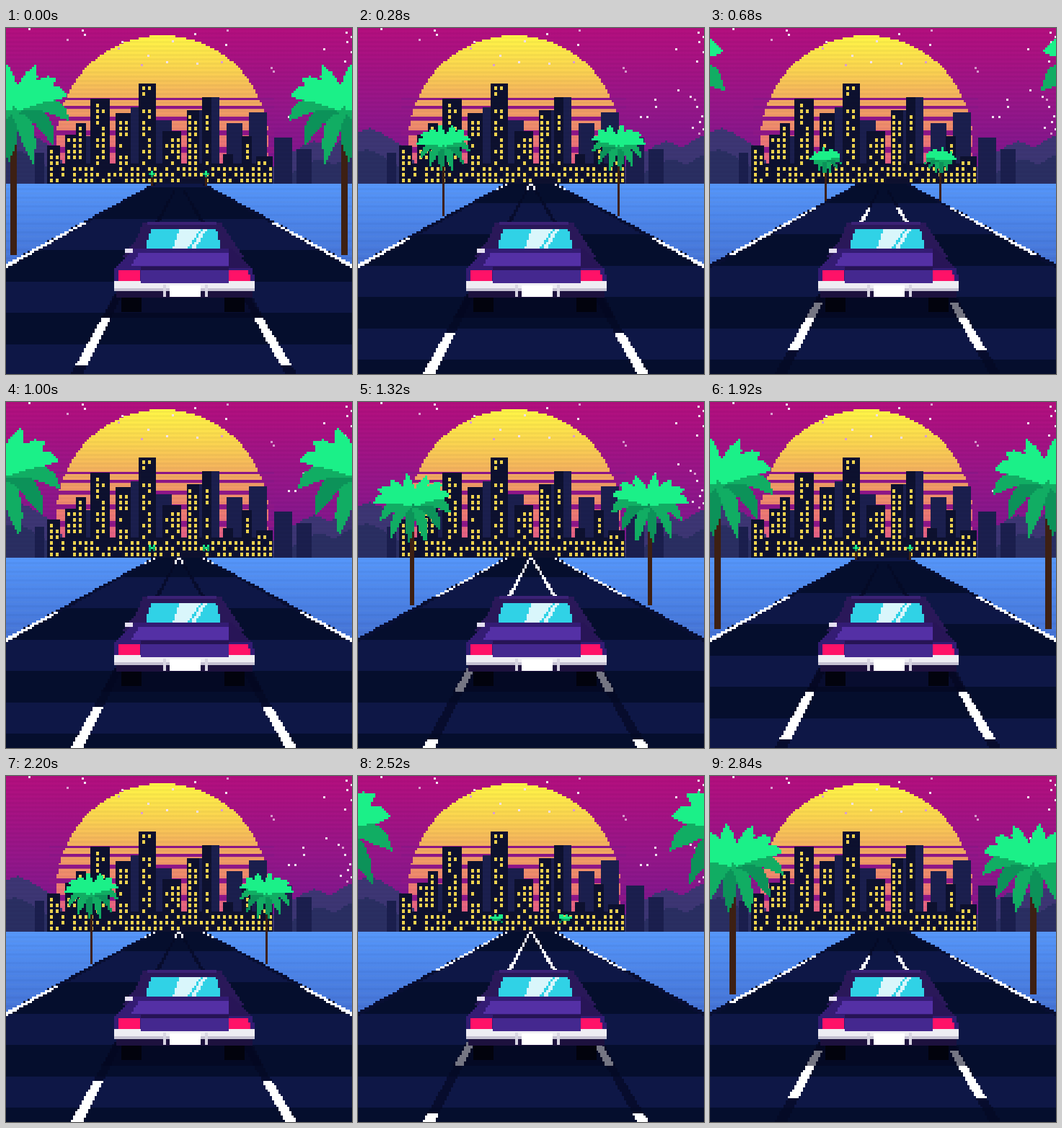
Recreate the animation shown at these times as an HTML page with a canvas. Size 480 by 480 pixels, loop 2.88 s.

```html
<!DOCTYPE html>
<html lang="en">
<head>
<meta charset="utf-8">
<title>Sunset drive</title>
<style>
html, body { margin: 0; width: 100%; height: 100%; overflow: hidden; background: #0b123c; }
canvas { display: block; width: 100vw; height: 100vh; image-rendering: pixelated; }
</style>
</head>
<body>
<canvas id="stage" width="480" height="480"></canvas>
<script>
const SIZE = 480, PX = 3, STEP = 40, LOOP = 2880, HORIZON = 216;
const stage = document.getElementById('stage').getContext('2d');
let ctx = stage;

function rect(x, y, w, h, color) {
  ctx.fillStyle = color;
  ctx.fillRect(x, y, w, h);
}

// Fills a polygon in rows of chunky pixels.
function poly(points, color) {
  ctx.fillStyle = color;
  const ys = points.map(p => p[1]);
  const top = Math.max(0, Math.floor(Math.min(...ys) / PX) * PX);
  const end = Math.min(SIZE, Math.max(...ys));
  for (let y = top; y < end; y += PX) {
    const mid = y + PX / 2, hits = [];
    points.forEach(([x1, y1], i) => {
      const [x2, y2] = points[(i + 1) % points.length];
      if ((y1 <= mid) !== (y2 <= mid)) hits.push(x1 + (mid - y1) / (y2 - y1) * (x2 - x1));
    });
    hits.sort((a, b) => a - b);
    for (let i = 0; i + 1 < hits.length; i += 2) {
      const a = Math.round(hits[i] / PX) * PX, b = Math.round(hits[i + 1] / PX) * PX;
      if (b > a) ctx.fillRect(a, y, b - a, PX);
    }
  }
}

// Four-sided shape given by its left and right ends at two heights.
const slab = (y1, l1, r1, y2, l2, r2, color) => poly([[l1, y1], [r1, y1], [r2, y2], [l2, y2]], color);

function gradient(y1, y2, ...colors) {
  const g = ctx.createLinearGradient(0, y1, 0, y2);
  colors.forEach((c, i) => g.addColorStop(i / (colors.length - 1), c));
  return g;
}

function layer(draw) {
  const c = document.createElement('canvas');
  c.width = c.height = SIZE;
  ctx = c.getContext('2d');
  draw();
  ctx = stage;
  return c;
}

const noise = (x, y) => {
  const v = Math.sin(x * 12.9898 + y * 78.233) * 43758.5453;
  return v - Math.floor(v);
};

function sky() {
  rect(0, 0, SIZE, HORIZON, gradient(0, HORIZON, '#b40f7e', '#961689', '#74188f'));
  const sun = gradient(10, 200, '#fff646', '#fbd450', '#f3a862', '#ee7c72', '#e2548c');
  for (let y = 10; y < HORIZON; y += PX) {
    const half = Math.round(Math.sqrt(147 ** 2 - (y + 1 - 157) ** 2) / PX) * PX;
    rect(217 - half, y, half * 2, PX, sun);
  }
  for (let i = 0; i < 6; i++) rect(60, 97 + 9 * i + 2 * i * i, 312, 3 + 1.3 * i, '#8f1789');
  // Stars thicken towards the upper right.
  for (let i = 1; i < 38; i++) {
    const x = 480 * (1 - 0.95 * noise(i, 3) ** 2), y = 150 * noise(i, 8) * x / 480;
    rect(Math.round(x), Math.round(y), 3, 3, i % 4 ? '#f6e6f5' : '#dc9fd0');
  }
}

function hill(x, y, color) {
  poly([[x - 85, HORIZON], [x - 45, y + 24], [x - 15, y + 6], [x, y], [x + 15, y + 6], [x + 45, y + 24], [x + 85, HORIZON]], color);
}

function hills() {
  for (const [x, y] of [[16, 139], [428, 157], [490, 144]]) hill(x, y, '#3d3674');
  for (const [x, y] of [[12, 168], [435, 181], [490, 172]]) hill(x, y, '#2a2f62');
}

// Left, top, width.
const BACK = [
  [40, 173, 13], [108, 150, 14], [173, 110, 16], [206, 128, 24], [251, 114, 22],
  [272, 96, 24], [306, 132, 22], [337, 117, 25], [372, 152, 25], [403, 168, 21]
];
const FRONT = [
  [57, 163, 18], [82, 148, 18], [97, 132, 14], [117, 98, 27], [152, 118, 21], [184, 77, 24],
  [217, 143, 26], [251, 114, 17], [272, 96, 13], [301, 175, 14], [327, 150, 14], [347, 178, 23], [57, 188, 313]
];

function city() {
  for (const [x, y, w] of BACK) rect(x, y, w, HORIZON - y, '#1b1f4e');
  for (const [x, y, w] of FRONT) rect(x, y, w, HORIZON - y, '#0d112f');
  for (const [x, y, w] of FRONT)
    for (let wy = 209; wy > y + 3; wy -= 8)
      for (let wx = 61 + Math.ceil((x - 59) / 8) * 8; wx < x + w - 4; wx += 8)
        if (noise(wx, wy) < 0.68) rect(wx, wy, 4, 5, '#f3d650');
}

function water() {
  rect(0, HORIZON, SIZE, 120, gradient(HORIZON, 336, '#5697fb', '#4b82e6', '#4470d2'));
  for (let y = HORIZON; y < 336; y += 12) rect(0, y, SIZE, 3, 'rgba(110,165,255,.16)');
}

const scenery = layer(() => {
  sky();
  hills();
  city();
  water();
  for (let y = 0; y < 336; y += 6) rect(0, y, SIZE, 3, 'rgba(0,0,40,.035)');
});

const car = layer(() => {
  slab(370, 150, 340, 403, 132, 358, 'rgba(4,7,30,.55)');
  for (const x of [160, 303]) rect(x, 368, 28, 26, '#02030d');

  // Cabin and rear window
  slab(269, 190, 298, 293, 181, 313, '#2a1859');
  slab(293, 181, 313, 318, 162, 330, '#2a1859');
  rect(196, 269, 96, 4, '#3b2276');
  slab(279, 201, 292, 307, 193, 298, '#30d2e6');
  slab(279, 240, 270, 307, 231, 251, '#d9f6fb');
  slab(279, 273, 279, 307, 256, 262, '#d9f6fb');

  // Boot
  slab(306, 177, 312, 333, 152, 341, '#341c74');
  slab(333, 150, 342, 354, 150, 345, '#341c74');
  slab(313, 184, 309, 331, 172, 309, '#5430a5');
  slab(306, 309, 314, 333, 309, 341, '#281557');
  rect(187, 331, 122, 5, '#261455');
  rect(187, 336, 122, 18, '#44288f');
  rect(165, 306, 11, 6, '#e5dff2');

  // Lights, bumper, plate
  slab(335, 155, 187, 355, 155, 187, '#ff1268');
  slab(335, 309, 336, 355, 309, 341, '#ff1268');
  rect(153, 363, 189, 11, '#1d113e');
  rect(150, 351, 195, 12, '#eeedf3');
  rect(187, 351, 122, 3, '#44288f');
  rect(150, 361, 195, 4, '#c5c1d2');
  for (const x of [218, 276]) rect(x, 356, 4, 17, '#d8d5e2');
  rect(227, 357, 43, 16, '#ffffff');
});

// Zero, then a steady climb of one per ms from `start`; `soft` rounds the corner.
const ramp = (p, start, soft) => soft * Math.log(1 + Math.exp((p - start) / soft));
const dashY = p => HORIZON + 0.55 * ramp(p, 142, 8);
const palmScale = p => 7.5 + 0.27 * ramp(p, 124, 30);

const edgeL = y => 207 - 1.81 * (y - HORIZON);
const edgeR = y => SIZE - edgeL(y);
const laneL = y => 240 - 0.535 * (y - 214);
const laneR = y => 240 + 0.585 * (y - 214);
const edgeW = y => 3 + 0.06 * (y - HORIZON);
const laneW = y => 3 + 0.05 * (y - HORIZON);

function strips(sides, width, y1, y2, color) {
  const w1 = width(y1) / 2, w2 = width(y2) / 2;
  for (const x of sides) slab(y1, x(y1) - w1, x(y1) + w1, y2, x(y2) - w2, x(y2) + w2, color);
}

function road(t) {
  const shift = t / STEP % 2 ? 0 : 22;
  const shape = [[edgeL(HORIZON), HORIZON], [edgeR(HORIZON), HORIZON], [SIZE, 330], [SIZE, SIZE], [0, SIZE], [0, 330]];
  poly(shape, '#0e1746');
  ctx.save();
  ctx.beginPath();
  shape.forEach(p => ctx.lineTo(...p));
  ctx.clip();
  for (let y = 112 + shift; y < SIZE; y += 87) rect(0, y, SIZE, 44, '#050e2d');
  ctx.restore();

  const edges = [edgeL, edgeR], lanes = [laneL, laneR];
  strips(edges, y => edgeW(y) + 2, HORIZON, 336, '#080e32');
  strips(lanes, laneW, 225, SIZE, 'rgba(4,9,36,.75)');
  for (let p = t % 240; p < 720; p += 240) {
    const top = dashY(p), bottom = dashY(p + 120);
    strips(edges, edgeW, top, bottom, '#ffffff');
    strips(lanes, laneW, top, bottom, '#ffffff');
  }
}

// A leaf from the hub: rises along a curve, droops to its tip and tapers off.
function frond(angle, len, color, draw) {
  const tx = Math.cos(angle) * len;
  const ty = Math.sin(angle) * len * (angle > 0 ? 1.1 : 0.75);
  const cx = tx * 0.65, cy = ty * 0.25 - 0.2 * Math.abs(Math.cos(angle));
  const a = [], b = [];
  for (let u = 0; u <= 1; u += 0.2) {
    const x = 2 * u * (1 - u) * cx + u * u * tx, y = 2 * u * (1 - u) * cy + u * u * ty;
    const dx = cx + u * (tx - 2 * cx), dy = cy + u * (ty - 2 * cy);
    const w = 0.1 * Math.sqrt(1 - u) * (1 + u) / Math.hypot(dx, dy);
    a.push([x - dy * w, y + dx * w - 2]);
    b.unshift([x + dy * w, y - dx * w - 2]);
  }
  draw([...a, ...b], color);
}

function palm(p) {
  const d = palmScale(p), x0 = 218 - 2 * d, y0 = 210 + d;
  const draw = (shape, color) => {
    const pts = shape.map(([x, y]) => [x0 + x * d, y0 + y * d]);
    poly(pts, color);
    poly(pts.map(([x, y]) => [SIZE - x, y]), color);
  };
  draw([[-0.05, -1.8], [0.05, -1.8], [0.05, 0], [-0.05, 0]], '#3d2013');
  const count = 13;
  for (let i = 0; i < count; i++) {
    // Lower leaves first, the bright crown on top.
    const angle = Math.PI / 2 + (i % 2 ? -1 : 1) * Math.PI * (i + 0.4) / count;
    const turn = Math.atan2(Math.sin(angle), Math.cos(angle));
    const len = 0.7 + 0.1 * noise(i, 1);
    frond(turn, len, turn < 0.15 || turn > 3 ? '#1bf088' : i % 3 ? '#11ad63' : '#0c9259', draw);
  }
}

function render(t) {
  ctx.drawImage(scenery, 0, 0);
  road(t);
  palm(t % 480);
  palm(t % 480 + 480);
  ctx.drawImage(car, 0, 0);
}

const start = performance.now();
let last = -1;
function tick() {
  const t = Math.floor((performance.now() - start) % LOOP / STEP) * STEP;
  if (t !== last) render(last = t);
  requestAnimationFrame(tick);
}
tick();
</script>
</body>
</html>
```
